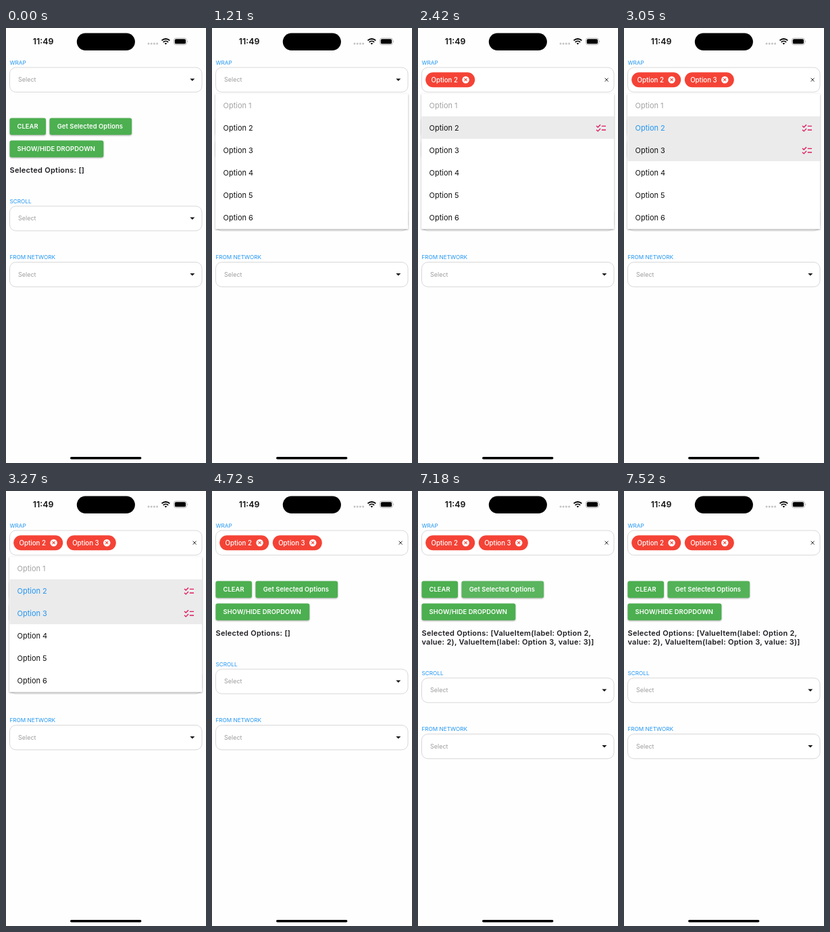
These frames come from a looping animation (296 by 640 pixels, 8000 ms). An HTML page:

```html
<!DOCTYPE html>
<html lang="en">
<head>
<meta charset="utf-8">
<title>Multi-select dropdown</title>
<style>
  html, body { margin: 0; width: 100%; height: 100%; overflow: hidden; background: #fefefe; }
  svg { display: block; width: 296px; height: 640px; font-family: Inter, Roboto, sans-serif; }

  .time { font-size: 12.4px; font-weight: 600; }
  .label { font-size: 8.2px; fill: #2196f3; }
  .hint { font-size: 9px; fill: #9e9e9e; }
  .button { fill: #4caf50; filter: drop-shadow(0 1.2px 1px rgba(0, 0, 0, .32)); }
  .button-text { font-size: 9.4px; font-weight: 600; letter-spacing: .08px; fill: #fff; }
  .result { font-size: 11px; font-weight: 600; letter-spacing: .26px; fill: #1d1b20; }
  .option { font-size: 11px; }
  .disabled { fill: #a3a3a3; }
  .chip-text { font-size: 9.7px; font-weight: 500; fill: #fff; }
  .card { fill: #fff; filter: drop-shadow(0 1.7px 1px rgba(0, 0, 0, .38)); }

  /* Every state change is a hard cut on one 8 s timeline */
  .menu, .first, .second, .empty, .before, .after, .lower, .ripple, .pick-a, .pick-b {
    animation: 8s step-end infinite;
  }
  .menu { animation-name: menu; }
  .first { animation-name: first; }
  .second { animation-name: second; }
  .empty { animation-name: empty; }
  .before { animation-name: before; }
  .after { animation-name: after; }
  .lower { animation-name: lower; }
  .ripple { animation-name: ripple; }
  .pick-a { animation-name: pick-a; }
  .pick-b { animation-name: pick-b; }

  @keyframes menu { 0% { opacity: 0 } 15.125% { opacity: 1 } 59%, 100% { opacity: 0 } }
  @keyframes first { 0% { opacity: 0 } 30.25%, 100% { opacity: 1 } }
  @keyframes second { 0% { opacity: 0 } 38.125%, 100% { opacity: 1 } }
  @keyframes empty { 0% { opacity: 1 } 30.25%, 100% { opacity: 0 } }
  @keyframes before { 0% { opacity: 1 } 89.75%, 100% { opacity: 0 } }
  @keyframes after { 0% { opacity: 0 } 89.75%, 100% { opacity: 1 } }
  @keyframes lower { 0% { transform: none } 89.75%, 100% { transform: translateY(13px) } }
  @keyframes ripple {
    0% { opacity: 0 } 88.375% { opacity: .03 } 89.75% { opacity: .08 }
    91.25% { opacity: .06 } 94%, 100% { opacity: .04 }
  }
  @keyframes pick-a { 0% { fill: #111 } 31.625% { fill: #19558a } 33%, 100% { fill: #2196f3 } }
  @keyframes pick-b { 0% { fill: #111 } 39.5% { fill: #19558a } 40.875%, 100% { fill: #2196f3 } }
</style>
</head>
<body>
<svg viewBox="0 0 296 640" fill="#111">
  <defs>
    <rect id="box" x="5.5" width="284.5" height="36.2" rx="9" fill="#fff" stroke="#c8c8c8" stroke-width=".7"/>
    <g id="empty">
      <text class="hint" x="18" y="21.2">Select</text>
      <path d="M272.3 16.4h7l-3.5 3.5z"/>
    </g>
    <g id="field">
      <use href="#box"/>
      <use href="#empty"/>
    </g>
    <g id="chip">
      <rect width="73" height="22" rx="11" fill="#f44336"/>
      <circle cx="59.4" cy="11" r="5.2" fill="#fff"/>
      <path d="M57.4 9l4 4m0-4l-4 4" stroke="#f44336" stroke-width="1.1"/>
    </g>
    <g id="selected">
      <rect x="5.5" width="284.5" height="33" fill="#ebebeb"/>
      <path d="M264 14l2.2 2.1 3.8-3.8M264 19.8l2.2 2.1 3.8-3.8M271.8 14.4h6.2M271.8 20h6.2"
        fill="none" stroke="#e0185f" stroke-width="1.35"/>
    </g>
  </defs>

  <rect width="296" height="640" fill="#fefefe"/>

  <!-- Status bar -->
  <text class="time" x="39.8" y="24.3">11:49</text>
  <rect x="104.8" y="7.6" width="86.1" height="25.5" rx="12.75" fill="#000"/>
  <g fill="#c4c4c4">
    <circle cx="211" cy="22.9" r="1.5"/><circle cx="215.2" cy="22.9" r="1.5"/>
    <circle cx="219.4" cy="22.9" r="1.5"/><circle cx="223.6" cy="22.9" r="1.5"/>
  </g>
  <g fill="none" stroke="#000" stroke-width="1.8">
    <path d="M230.5 18.4a8.4 8.4 0 0 1 11.8 0M232.7 20.9a5.3 5.3 0 0 1 7.4 0"/>
    <path d="M234.7 22.6a2.5 2.5 0 0 1 3.4 0l-1.7 1.8z" fill="#000" stroke="none"/>
  </g>
  <rect x="248.5" y="15" width="18.8" height="9.6" rx="3" fill="none" stroke="#a2a2a2" stroke-width=".8"/>
  <rect x="249.8" y="16.3" width="16.2" height="7" rx="1.9" fill="#000"/>
  <path d="M268.5 18.2q1.6 1.6 0 3.2z" fill="#a2a2a2"/>

  <!-- First field -->
  <text class="label" x="5.5" y="53.5">WRAP</text>
  <use href="#box" y="58.1"/>
  <g class="empty"><use href="#empty" y="58.1"/></g>
  <g class="first">
    <use href="#chip" x="11.2" y="65.2"/>
    <text class="chip-text" x="19.6" y="79.7">Option 2</text>
    <path d="M276.6 73.7l5 5m0-5l-5 5" stroke="#222" stroke-width="1"/>
  </g>
  <g class="second">
    <use href="#chip" x="89.8" y="65.2"/>
    <text class="chip-text" x="98.2" y="79.7">Option 3</text>
  </g>

  <!-- Buttons and result -->
  <rect class="button" x="5.5" y="132.6" width="53.5" height="24.7" rx="2.8"/>
  <rect class="button" x="64.5" y="132.6" width="121.6" height="24.7" rx="2.8"/>
  <rect class="ripple" x="64.5" y="132.6" width="121.6" height="24.7" rx="2.8" fill="#fff"/>
  <rect class="button" x="5.5" y="165.6" width="138.8" height="24.7" rx="2.8"/>
  <g class="button-text">
    <text x="16.5" y="148.4">CLEAR</text>
    <text x="75.7" y="148.4">Get Selected Options</text>
    <text x="16.5" y="181.3">SHOW/HIDE DROPDOWN</text>
  </g>
  <text class="result before" x="5.5" y="213">Selected Options: []</text>
  <g class="result after">
    <text x="5.5" y="213">Selected Options: [ValueItem(label: Option 2,</text>
    <text x="5.5" y="226">value: 2), ValueItem(label: Option 3, value: 3)]</text>
  </g>

  <!-- Lower fields -->
  <g class="lower">
    <text class="label" x="5.5" y="257.5">SCROLL</text>
    <use href="#field" y="262.1"/>
    <text class="label" x="5.5" y="340">FROM NETWORK</text>
    <use href="#field" y="344.6"/>
  </g>

  <!-- Dropdown menu -->
  <g class="menu">
    <rect class="card" x="5" y="97" width="285.2" height="198.8"/>
    <g class="first"><use href="#selected" y="130"/></g>
    <g class="second"><use href="#selected" y="163"/></g>
    <g class="option">
      <text class="disabled" x="16.5" y="118.1">Option 1</text>
      <text class="pick-a" x="16.5" y="151.1">Option 2</text>
      <text class="pick-b" x="16.5" y="184.1">Option 3</text>
      <text x="16.5" y="217.1">Option 4</text>
      <text x="16.5" y="250.1">Option 5</text>
      <text x="16.5" y="283.1">Option 6</text>
    </g>
  </g>

  <rect x="95" y="631" width="105.4" height="3.5" rx="1.75" fill="#000"/>
</svg>
</body>
</html>
```
